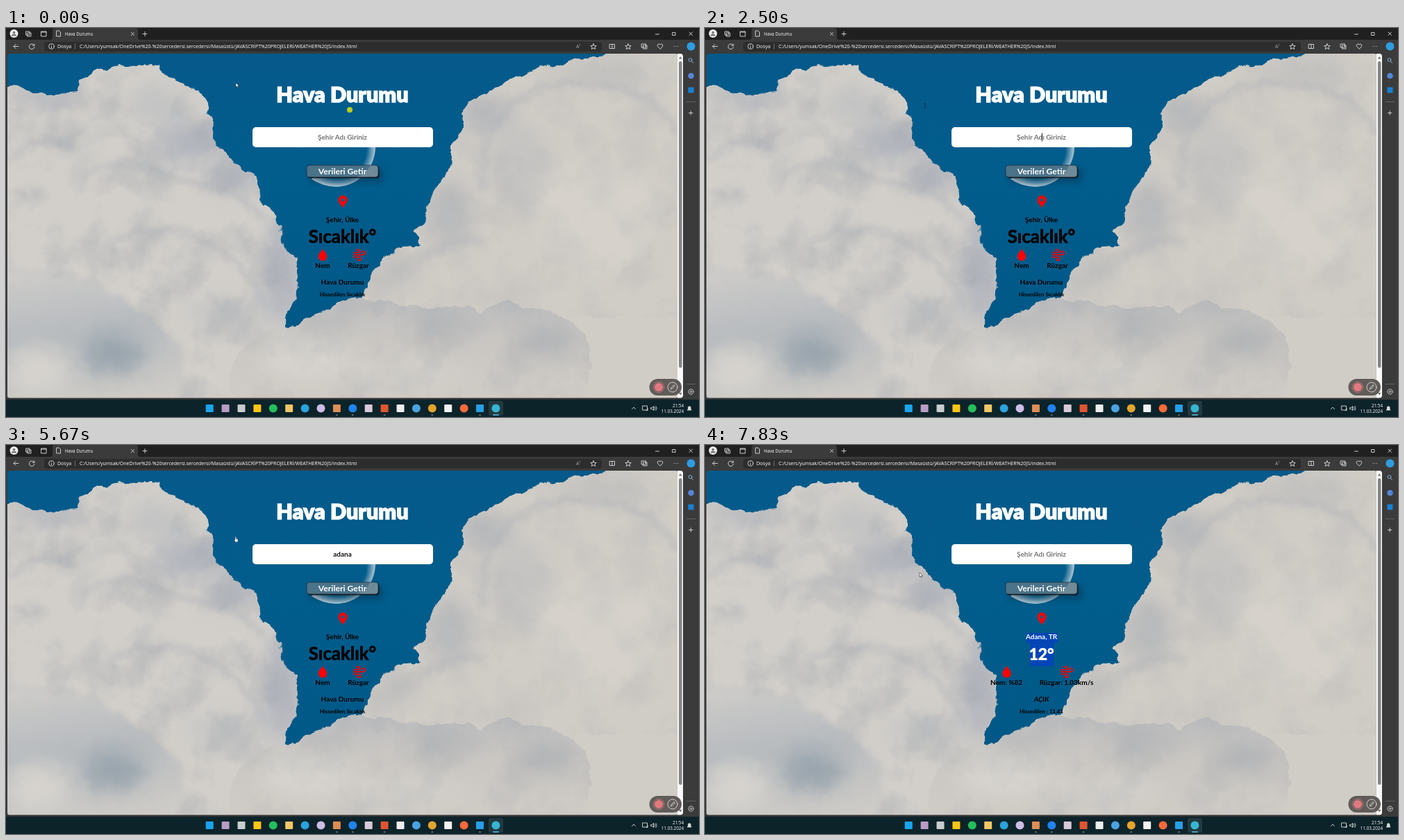
An HTML page that plays this animation: 998x561 px, repeating every 8 s.

```html
<!DOCTYPE html>
<html lang="tr">
<head>
<meta charset="utf-8">
<title>Hava Durumu</title>
<style>
  html, body { margin: 0; width: 100%; height: 100%; overflow: hidden; background: #3b3b3b; }
  svg { position: absolute; left: 0; top: 0; width: 998px; height: 561px; }
  #photo { will-change: transform; }
  text { font: 700 10px Lato, "Open Sans", sans-serif; text-anchor: middle; white-space: pre; }
  .ui text { font: 400 7px "Open Sans", "Noto Sans", sans-serif; fill: #fff; text-anchor: start; }
  .line { fill: none; stroke: #ddd; stroke-width: .9; stroke-linecap: round; stroke-linejoin: round; }
  .fold { fill: none; stroke: #a9aeb6; stroke-width: 9; opacity: .4; }
</style>
</head>
<body>
<svg id="photo" viewBox="0 0 998 561">
  <defs>
    <linearGradient id="sky" x2="0" y2="1">
      <stop stop-color="#06598a"/><stop offset=".4" stop-color="#015d8c"/><stop offset="1" stop-color="#005583"/>
    </linearGradient>
    <linearGradient id="front" x2="0" y2="1">
      <stop stop-color="#bbbcbe"/><stop offset=".35" stop-color="#cac7c3"/><stop offset="1" stop-color="#d1cdc7"/>
    </linearGradient>
    <linearGradient id="corner" x2=".2" y2="1">
      <stop stop-color="#cfcdca"/><stop offset=".5" stop-color="#b6babe"/><stop offset="1" stop-color="#cfccc7"/>
    </linearGradient>
    <radialGradient id="moon" gradientUnits="userSpaceOnUse" cx="478" cy="175" r="54">
      <stop offset=".76" stop-color="#c9d6dd" stop-opacity="0"/><stop offset="1" stop-color="#c9d6dd" stop-opacity=".9"/>
    </radialGradient>
    <filter id="fluff" x="-5%" y="-5%" width="110%" height="110%" color-interpolation-filters="sRGB">
      <feTurbulence type="fractalNoise" baseFrequency=".05" numOctaves="3" seed="4"/>
      <feDisplacementMap in="SourceGraphic" scale="15" xChannelSelector="R" yChannelSelector="G"/>
      <feGaussianBlur stdDeviation=".6"/>
    </filter>
    <filter id="mist" x="0" y="0" width="100%" height="100%" color-interpolation-filters="sRGB">
      <feTurbulence type="fractalNoise" baseFrequency=".017" numOctaves="4" seed="9"/>
      <feColorMatrix values="0 0 0 0 .56 0 0 0 0 .59 0 0 0 0 .64 1.6 0 0 0 -.7"/>
    </filter>
    <filter id="soft" x="-60%" y="-60%" width="220%" height="220%"><feGaussianBlur stdDeviation="15"/></filter>
    <filter id="haze" x="-20%" y="-20%" width="140%" height="140%"><feGaussianBlur stdDeviation="5"/></filter>
    <clipPath id="page"><rect x="2" y="37" width="966" height="497" rx="4"/></clipPath>
    <path id="left" d="M-20 86L30 88 58 97 100 94 104 76 128 62 180 52 220 56 238 72 286 94 288 116 299 132 298 160 322 186 342 206 362 215 368 248 390 268 396 292 402 320 418 334 421 372 409 402 401 428 420 560H-20Z"/>
    <path id="right" d="M1000 20H900L868 38 850 41 800 50 752 62 718 78 690 95 664 107 656 124 660 146 641 172 640 204 612 240 606 268 602 286 586 294 598 312 562 318 536 342 524 368 500 400V560H1000Z"/>
    <path id="low" d="M322 560V488L346 456 372 436 400 431 420 426 470 400 502 387 560 396 604 405 652 401 682 408 720 393 744 402 792 410 830 434 842 464 834 560Z"/>
    <path id="nook" d="M-20 350L42 354 104 362 132 370 152 386 192 410 232 440 255 470 250 505 238 560H-20Z"/>
    <clipPath id="inLeft"><use href="#left"/></clipPath>
    <clipPath id="inRight"><use href="#right"/></clipPath>
    <clipPath id="inLow"><use href="#low"/></clipPath>
  </defs>
  <g clip-path="url(#page)">
    <rect width="998" height="561" fill="url(#sky)"/>
    <path d="M532 170C532 205 505 229 475 229Q455 228 440 218L478 175Z" fill="url(#moon)"/>
    <g filter="url(#fluff)">
      <g clip-path="url(#inLeft)">
        <use href="#left" fill="#d2cfca"/>
        <g filter="url(#soft)" fill="#a9aeb9">
          <ellipse cx="265" cy="165" rx="50" ry="28" opacity=".8"/><ellipse cx="330" cy="215" rx="35" ry="18"/>
          <ellipse cx="398" cy="350" rx="25" ry="80" opacity=".8"/><ellipse cx="60" cy="102" rx="45" ry="10"/>
          <ellipse cx="215" cy="110" rx="40" ry="25" opacity=".4"/><ellipse cx="320" cy="410" rx="60" ry="15" opacity=".4"/>
        </g>
        <g class="fold" filter="url(#haze)">
          <path d="M110 215Q160 180 215 205T300 230 372 275M2 190Q50 150 105 175M150 310Q220 270 290 310T370 400"/>
        </g>
        <rect width="425" height="534" filter="url(#mist)" opacity=".5"/>
        <use href="#nook" fill="none" stroke="#a9aeb6" stroke-width="5" opacity=".35" filter="url(#haze)"/>
      </g>
      <g clip-path="url(#inRight)">
        <use href="#right" fill="#d0ccc6"/>
        <g filter="url(#soft)" fill="#b3b6ba">
          <ellipse cx="690" cy="125" rx="40" ry="18"/><ellipse cx="640" cy="270" rx="32" ry="50" opacity=".7"/>
          <ellipse cx="740" cy="200" rx="45" ry="60" opacity=".35"/><ellipse cx="560" cy="350" rx="35" ry="20" opacity=".6"/>
          <ellipse cx="870" cy="60" rx="60" ry="14" opacity=".6"/><ellipse cx="850" cy="270" rx="90" ry="80" fill="#d6d2cb"/>
        </g>
        <path class="fold" filter="url(#haze)" d="M686 235Q678 150 730 110T836 83Q905 75 950 127L970 150M600 330Q640 300 690 310"/>
        <rect x="500" y="37" width="470" height="380" filter="url(#mist)" opacity=".22"/>
      </g>
      <use href="#nook" fill="url(#corner)" filter="url(#haze)"/>
      <g filter="url(#soft)">
        <ellipse cx="45" cy="495" rx="45" ry="35" fill="#d6d3ce"/><ellipse cx="155" cy="470" rx="45" ry="28" fill="#98a4ad"/>
      </g>
      <g clip-path="url(#inLow)">
        <use href="#low" fill="url(#front)"/>
        <g filter="url(#soft)" fill="#d6d3cd">
          <ellipse cx="430" cy="475" rx="65" ry="35"/><ellipse cx="570" cy="500" rx="90" ry="22" opacity=".6"/>
          <ellipse cx="780" cy="450" rx="45" ry="22" fill="#b1b3b6"/><ellipse cx="640" cy="430" rx="50" ry="12" fill="#b1b3b6"/>
        </g>
        <rect x="322" y="385" width="520" height="150" filter="url(#mist)" opacity=".3"/>
      </g>
    </g>
  </g>
</svg>

<svg viewBox="0 0 998 561">
  <g class="ui">
    <path d="M0 0H998V17H0Z" fill="#202020"/>
    <path d="M0 17H998V37H0ZM975 37H998V536H975ZM0 37H2V536H0Z" fill="#3b3b3b"/>
    <path d="M0 533.500H975V536H0Z" fill="#343434"/>
    <path d="M63 17Q67 17 67 13V4Q67 0 71 0H186Q190 0 190 4V13Q190 17 194 17Z" fill="#3b3b3b"/>
    <rect x="55" y="20" width="803" height="14" rx="4" fill="#2d2d2d"/>
    <circle cx="11.500" cy="8" r="6" fill="#eee"/>
    <circle cx="11.500" cy="6.500" r="1.800" fill="#777"/><path d="M8 11.500a3.500 3 0 0 1 7 0z" fill="#777"/>
    <g class="line">
      <path d="M29 5h5v5h-5zM31 7h5v5h-5zM51 5h7v7h-7zM51 6h7M73 4h3.500l2 2v6H73zM180.500 6.500l4 4m0-4l-4 4M197 8.500h6M200 5.500v6"/>
      <path d="M935.500 9h5M960 6.500h4v4h-4zM984 6l4.500 4.500m0-4.500L984 10.500"/>
      <path d="M18 26.500H11l3-3m-3 3l3 3M40.500 25a3.800 3.800 0 1 0 .4 2.500M40.800 23v2.300h-2.300M65.500 26.500v2m0-4v.1"/>
      <circle cx="65.500" cy="26.500" r="3.800"/>
      <path d="M99.500 23v7" stroke="#777"/>
      <path id="star" d="M846 22.800l1.200 2.700 3 .2-2.300 1.900.8 2.900-2.700-1.600-2.700 1.600.8-2.900-2.300-1.900 3-.2z"/>
      <use href="#star" x="50"/>
      <path d="M869.500 23.500h7v6h-7zM873 23.500v6M915.500 23h6v5h-6zM918 25h5v5h-5zM942 30l-3.500-3.500a2 2 0 0 1 3.500-2.500 2 2 0 0 1 3.500 2.500zM962 26.500h.1m2.700 0h.1m2.700 0h.1"/>
      <circle cx="985.500" cy="46" r="2.400" stroke="#8fb8e8"/><path d="M987.500 48l2 2.500" stroke="#8fb8e8"/>
      <path d="M980 106.500h13M980 513.500h13" stroke="#666"/><path d="M983.500 122.500h5.500m-2.750-2.750v5.500"/>
      <circle cx="986.500" cy="524.500" r="1.300"/><circle cx="986.500" cy="524.500" r="3.700" stroke-dasharray="2 .9"/>
    </g>
    <circle cx="986.500" cy="26.500" r="6" fill="#2f9de0"/>
    <circle cx="986.500" cy="69" r="4.300" fill="#5585d6"/>
    <rect x="982.500" y="85.500" width="8" height="8" fill="#1781d5"/>
    <text x="85" y="10.500" style="font-size:6.200px">Hava Durumu</text>
    <text x="74" y="29">Dosya</text>
    <text x="106" y="29">C:/Users/yumsak/OneDrive%20-%20sercedersi.sercedersi/Masaüstü/JAVASCRİPT%20PROJELERİ/WEATHER%20JS/index.html</text>
    <text x="821" y="29" style="fill:#aaa">A⁾</text>
    <path d="M967 37H971Q975 37 975 41V530Q975 533.500 971 533.500H967Z" fill="#f8f8f8"/>
    <rect x="969" y="48" width="4.500" height="442" rx="2.200" fill="#858585"/>
    <path d="M968.800 44.500l2.400-3.500 2.400 3.500zM968.800 526l2.400 3.500 2.400-3.500z" fill="#777"/>
    <rect x="926.500" y="506" width="46.500" height="24" rx="12" fill="#615c59"/>
    <circle cx="940" cy="518" r="6" fill="#e17a80"/><circle cx="940" cy="518" r="7.500" fill="none" stroke="#d77c80" stroke-width=".8"/>
    <g class="line"><circle cx="960" cy="518" r="7"/><path d="M957.500 520.500l.5-1.800 4-4 1.300 1.300-4 4z"/></g>
    <path d="M0 536H998V561H0Z" fill="#0d232a"/>
    <g id="tasks"></g>
    <g class="line"><path d="M901.500 549.500l2.500-2.500 2.500 2.500M917 545h6.500v6H917zM922 551.500h2v-3M929 547.500h1.500l2-2v6l-2-2H929zM934 546.500q2 2 0 4M936 545.500q2.500 3 0 6"/>
    <path d="M981.500 551h5.500l-1-1.500v-2a1.800 1.800 0 0 0-3.600 0v2z" fill="#ddd"/></g>
    <text x="976" y="547" style="font-size:6.300px;text-anchor:end">21:54</text>
    <text x="976" y="555" style="font-size:6.300px;text-anchor:end">11.03.2024</text>
  </g>

  <rect id="titleSel" y="73" height="44" fill="#0545b7"/>
  <text x="484.500" y="107" fill="#fff" stroke="#fff" stroke-width="1.300" style="font-size:30.500px;font-weight:900">Hava Durumu</text>
  <circle id="dot" cx="495" cy="118" r="4" fill="#bccb24"/>
  <rect x="355" y="143" width="260" height="29" rx="5" fill="#fff"/>
  <text id="field" x="484.500" y="161"></text>
  <path id="caret" d="M0 151.500v12" stroke="#111" stroke-width=".9"/>
  <rect x="437" y="203" width="106" height="20" rx="6" fill="#002238" opacity=".35" style="filter:blur(5px)"/>
  <rect x="434" y="199" width="103.500" height="17.500" rx="4.500" fill="#10151a"/>
  <rect x="433" y="198" width="103" height="17" rx="4" fill="#4b7389" stroke="#26333c" stroke-width=".8"/>
  <path d="M524 198.500H532Q535.500 198.500 535.500 203V211Q535.500 214.500 531 214.500H505Q520 210 524 198.500Z" fill="#8799a4" opacity=".6"/>
  <text x="484.500" y="211.300" fill="#fff" style="font-size:12.200px">Verileri Getir</text>

  <path d="M485 259.500C483 255 478.500 252 478.500 248a6.500 6.500 0 0 1 13 0C491.500 252 487 255 485 259.500ZM485 245.700a2.300 2.300 0 1 0 .01 0Z" fill="#f00" fill-rule="evenodd"/>
  <path id="citySel" d="M463 271h45v14.500h-45z" fill="#0545b7"/>
  <path id="tempSel" d="M468 285.500h34V319h-34z" fill="#0545b7"/>
  <text id="city" x="484.500" y="280"></text>
  <text id="temp" x="484.500" y="310" stroke-width=".7"></text>
  <path id="drop" d="M456 318.500c2 4 6.200 7 6.200 11a6.200 6.200 0 0 1-12.400 0c0-4 4.200-7 6.200-11z" fill="#f00"/>
  <path id="wind" d="M500 324h7a2.300 2.300 0 1 0-2.300-2.300M500 327.200h14.400a2.600 2.600 0 1 0-2.600-2.600M500 330.400h8.400a2.400 2.400 0 1 1-2.400 2.400" fill="none" stroke="#f00" stroke-width="1.700"/>
  <text id="humid" y="346"></text>
  <text id="gust" y="346"></text>
  <text id="sort" x="484.500" y="370"></text>
  <text id="feel" x="484.500" y="387" style="font-size:8px"></text>

  <g id="cursor">
    <path id="arrow" d="M0 0V6.300L1.500 5 2.500 7.200 3.400 6.800 2.500 4.700H4.500Z" fill="#fff" stroke="#111" stroke-width=".5"/>
    <path id="beam" d="M-1.300-3h2.600M0-3v6M-1.300 3h2.600" stroke="#1b2833" stroke-width=".8"/>
    <path id="hand" d="M-1-3.500Q0-4.200.5-3.300V-1L2.500-.3Q3.300 0 3 1.500L2.300 4H-.7L-2.300 1.200-1 .8Z" fill="#fff" stroke="#223" stroke-width=".4"/>
    <path id="block" d="M-6-5.500H-4.500L-3.500-4.500H3.500L4.500-5.500H6V6H-6Z" fill="#000"/>
  </g>
</svg>

<script>
const LOOP = 8000, STEP = 1000 / 6;
const $ = id => document.getElementById(id);
const show = (id, on) => $(id).setAttribute('display', on ? 'inline' : 'none');
const within = (t, a, b) => t >= a && t < b;

// Taskbar marks: one plain shape each
const marks = '#19a5ee #b99cc4 #c8cccd #fac515 #24bf5b #f0c766 #2ba3dc #cdbde6 #dd8e55 #2083ee #d8c9d8 #e0552f #eeeeee #4aa3e0 #e3a52d #f2f2f2 #fb6a3a #259fe8 #35b5d2'.split(' ');
const round = [4, 6, 7, 9, 13, 14, 16, 18];
const open = [8, 9, 11, 14, 17];
$('tasks').innerHTML = '<rect x="695" y="538" width="21" height="21" rx="2" fill="#23383f"/>' +
  marks.map((c, i) => {
    const x = 293.2 + i * 22.9;
    return (round.includes(i)
      ? `<circle cx="${x}" cy="548.500" r="6" fill="${c}"/>`
      : `<rect x="${x - 5.5}" y="543" width="11" height="11" rx="1" fill="${c}"/>`) +
      (open.includes(i) ? `<rect x="${x - 1.5}" y="557.500" width="3" height="1.200" rx=".6" fill="#8a989d"/>` : '');
  }).join('') + '<rect x="701" y="557.300" width="9" height="1.500" rx=".7" fill="#55c3f0"/>';

// time, x, y, shape
const moves = [
  [0, 331, 79, 'arrow'], [170, 340, 75, 'arrow'], [500, 375, 64, 'beam'], [830, 300, 65, 'block'],
  [1000, 269, 66, 'block'], [1330, 305, 85, 'beam'], [1670, 322, 113, 'beam'], [2330, 317, 112, 'beam'],
  [4830, 317, 112, 'beam'], [5170, 325, 125, 'arrow'], [5500, 331, 136, 'hand'], [5900, 331, 136, 'hand'],
  [6330, 360, 181, 'arrow'], [6830, 336, 205, 'beam'], [7000, 335, 207, 'beam'], [7500, 318, 192, 'beam'],
  [7830, 309, 184, 'arrow'], [LOOP, 309, 184, 'arrow']
];

function moveCursor(t) {
  const i = moves.findIndex(m => m[0] > t) - 1;
  const [t0, x0, y0, shape] = moves[i], [t1, x1, y1] = moves[i + 1];
  const k = (t - t0) / (t1 - t0);
  $('cursor').setAttribute('transform', `translate(${x0 + (x1 - x0) * k} ${y0 + (y1 - y0) * k})`);
  for (const s of ['arrow', 'beam', 'hand', 'block']) show(s, s === shape);
}

function drawField(t) {
  const typed = t < 5995 ? 'adana'.slice(0, Math.max(0, Math.floor((t - 3165) / STEP) + 1)) : '';
  const field = $('field');
  field.textContent = typed || 'Şehir Adı Giriniz';
  field.setAttribute('fill', typed ? '#111' : '#757575');
  const x = typed ? 485 + field.getComputedTextLength() / 2 : 485.5;
  $('caret').setAttribute('transform', `translate(${x})`);
  show('caret', within(t, 2495, 4165) || within(t, 4665, 5165) || within(t, 5995, 6495));
}

function put(id, text, x) {
  $(id).textContent = text;
  if (x) $(id).setAttribute('x', x);
}

function drawResult(t) {
  const done = t >= 5995;
  put('city', done ? 'Adana, TR' : 'Şehir, Ülke');
  put('temp', done ? '12°' : 'Sıcaklık°');
  put('humid', done ? 'Nem: %82' : 'Nem', done ? 434 : 456);
  put('gust', done ? 'Rüzgar: 1.03km/s' : 'Rüzgar', done ? 520.5 : 507.5);
  put('sort', done ? 'AÇIK' : 'Hava Durumu');
  put('feel', done ? 'Hissedilen : 11.41' : 'Hissedilen Sıcaklık');
  $('temp').style.fontSize = done ? '23px' : '25.8px';
  $('sort').style.fontStyle = done ? 'italic' : 'normal';
  $('drop').setAttribute('transform', `translate(${done ? -21.5 : 0})`);
  $('wind').setAttribute('transform', `translate(${done ? 12 : 0})`);
  const tempOn = t >= 7160, cityOn = t >= 7495;
  const tempInk = tempOn ? '#fff' : '#000';
  show('tempSel', tempOn);
  show('citySel', cityOn);
  $('temp').setAttribute('fill', tempInk);
  $('temp').setAttribute('stroke', tempInk);
  $('city').setAttribute('fill', cityOn ? '#fff' : '#000');
}

function draw(t) {
  moveCursor(t);
  show('dot', t < 160);
  const left = 562 - 153 * Math.min(1, Math.max(0, (t - 500) / 500));
  $('titleSel').setAttribute('x', left);
  $('titleSel').setAttribute('width', 562 - left);
  show('titleSel', within(t, 500, 1325));
  drawField(t);
  drawResult(t);
}

const start = performance.now();
let last = -1;
function tick() {
  const t = (performance.now() - start) % LOOP;
  const step = Math.min(47, Math.floor((t + 5) / STEP));
  if (step !== last) draw((last = step) * STEP);
  requestAnimationFrame(tick);
}
tick();
</script>
</body>
</html>
```
